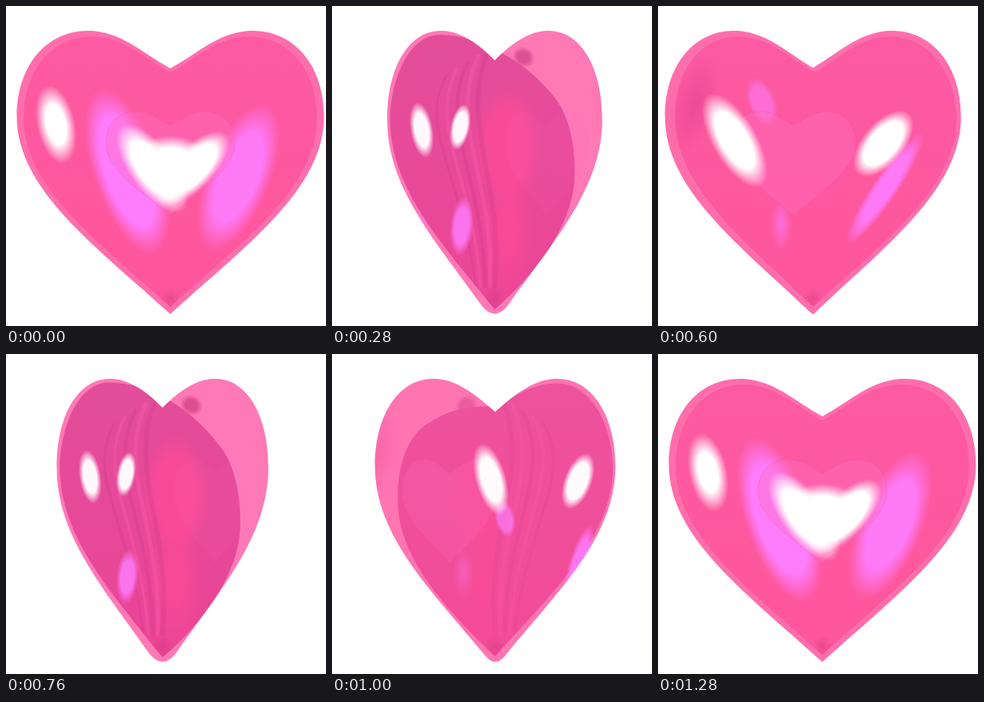
Recreate the animation shown at these times as an HTML page with a canvas. Size 400x400 px, loop 1.32 s.

```html
<!DOCTYPE html>
<html lang="en">
<head>
<meta charset="utf-8">
<title>Turning heart</title>
<style>
  html, body { margin: 0; width: 100%; height: 100%; overflow: hidden; background: #fff; }
  canvas { display: block; width: 400px; height: 400px; }
</style>
</head>
<body>
<canvas id="stage" width="400" height="400"></canvas>
<script>
const ctx = document.getElementById('stage').getContext('2d');
const LOOP = 1320, STEP = 40, TURN = 1280;
const AXIS = 199.5, MID_Y = 190, DEPTH = 66, SLICES = 120;
const RAD = Math.PI / 180;
const WHITE = '255,255,255', VIOLET = '255,125,255';

// Eased turn: [time, degrees]
const TURNS = [[0, 0], [160, 14.5], [440, 105], [600, 163.5], [920, 294], [1120, 345], [TURN, 360]];

// Half outline as bezier points: a full lobe, and a lobe smoothed into a teardrop
const LOBE = [[35, 59], [62, 31], [103, 31], [157, 31], [192, 77], [192, 138], [192, 230], [92, 301]];
const DROP = [[50, 62], [100, 95], [140, 135], [165, 165], [174, 205], [170, 240], [160, 290], [90, 350]];
const NOTCH = [0, 78], TIP = [0, 385];

const clamp = (v, lo, hi) => Math.min(hi, Math.max(lo, v));
const mix = (a, b, k) => a + (b - a) * k;
const blend = (p, q, k) => p.map((v, i) => mix(v, q[i], k));
const smooth = (a, b, v) => {
  const k = clamp((v - a) / (b - a), 0, 1);
  return k * k * (3 - 2 * k);
};

function angleAt(time) {
  const last = TURNS.length - 1;
  let i = 0;
  while (i < last - 1 && time > TURNS[i + 1][0]) i++;
  const slope = n => n === 0 || n === last ? 0
    : (TURNS[n + 1][1] - TURNS[n - 1][1]) / (TURNS[n + 1][0] - TURNS[n - 1][0]);
  const [t0, a0] = TURNS[i], [t1, a1] = TURNS[i + 1];
  const span = t1 - t0, k = (time - t0) / span, r = 1 - k;
  return a0 * (1 + 2 * k) * r * r + a1 * k * k * (3 - 2 * k)
    + span * k * r * (slope(i) * r - slope(i + 1) * k);
}

// drop smooths the lobe on the near side; bulge pushes the middle sideways
function addHeart(path, cx, squeeze, scale, { drop = 0, near = 1, bulge = 0 } = {}) {
  const place = ([x, y]) => {
    const rise = (y - MID_Y) / (TIP[1] - MID_Y);
    return [cx + x * scale * squeeze + bulge * (1 - rise * rise), MID_Y + (y - MID_Y) * scale];
  };
  const half = side => LOBE.map((p, i) => {
    const goal = side === near ? DROP[i] : i === 0 ? [20, 35] : p;
    const [x, y] = blend(p, goal, drop);
    return place([side * x, y]);
  });
  const notch = place(blend(NOTCH, [10 * near, 42], drop)), tip = place(TIP);
  const right = half(1), left = half(-1);
  const curve = (a, b, c) => path.bezierCurveTo(...a, ...b, ...c);
  path.moveTo(...notch);
  curve(right[0], right[1], right[2]);
  curve(right[3], right[4], right[5]);
  curve(right[6], right[7], tip);
  curve(left[7], left[6], left[5]);
  curve(left[4], left[3], left[2]);
  curve(left[1], left[0], notch);
  path.closePath();
}

function glow(color, core, x, y, rx, ry, tilt, alpha) {
  if (alpha <= 0) return;
  ctx.save();
  ctx.translate(x, y);
  ctx.rotate(tilt * RAD);
  ctx.scale(rx, ry);
  const fill = ctx.createRadialGradient(0, 0, 0, 0, 0, 1);
  fill.addColorStop(0, `rgba(${color},${alpha})`);
  fill.addColorStop(core, `rgba(${color},${alpha})`);
  fill.addColorStop(1, `rgba(${color},0)`);
  ctx.fillStyle = fill;
  ctx.fillRect(-1, -1, 2, 2);
  ctx.restore();
}

function drawInterior(cx, dir, side) {
  ctx.save();
  ctx.globalAlpha = side;
  glow('255,75,150', 0.6, cx - dir * 16, 175, 42, 75, 0, 0.9);
  glow('255,75,150', 0.3, cx - dir * 16, 280, 34, 85, 0, 0.8);
  ctx.lineCap = 'round';
  for (let i = 0; i < 5; i++) {
    const x = cx + dir * (8 + i * 13);
    ctx.strokeStyle = i % 2 ? 'rgba(255,95,175,.4)' : 'rgba(190,50,130,.25)';
    ctx.lineWidth = 6 - i * 0.7;
    ctx.beginPath();
    ctx.moveTo(x, 55 + i * 8);
    ctx.bezierCurveTo(x + dir * 38, 150, x - dir * 20, 210, cx + dir * i * 6, 350);
    ctx.stroke();
  }
  ctx.restore();
}

// Reflections slide with the tilt, merge when facing front and gather into a pair at the side
function drawReflections(cx, angle, squeeze, dir, side, drawInner) {
  const t = clamp(angle / 15, -1, 1), front = 1 - Math.abs(t);
  const reach = dir * (190 * squeeze - 48);
  const leftEdge = reach + Math.min(0, dir * 26), rightEdge = reach + Math.max(0, dir * 26);
  const shine = (color, core, facing, edge) => {
    const [x, ...shape] = blend(facing, edge, side);
    glow(color, core, cx + x, ...shape);
  };

  glow('222,58,142', 0.1, cx + 149 * t, 124, 28, 66, -15 * t, 0.45 * Math.abs(t) * (1 - side));
  shine(VIOLET, 0.65,
    [-70 - 6 * t + 16 * front, 181 + 61 * t + 26 * front, 24 + 7 * t + 18 * front,
      53 + 21 * t + 55 * front, -27 - 5 * t + 8 * front, 0.78 + 0.22 * t + 0.2 * front],
    [leftEdge, 298, 8, 15, 0, 0.8]);
  shine(VIOLET, 0.6,
    [81 - 9 * t + 4 * front, 214 - 14 * t, 26 + 10 * t + 14 * front, 98 + 14 * t, 29 - 5 * t - 7 * front, 0.9],
    [rightEdge, 298, 8, 15, 0, 0.8]);
  glow(VIOLET, 0.2, cx - 40, 273, 13, 32, 0, -0.55 * t * (1 - side));

  drawInner();

  glow(WHITE, 0.5, cx - 143 - 17 * t, 148 - 9 * t, 24 - 13 * t, 50 - 14 * t, -12 + 12 * t,
    (1 + Math.min(t, 0)) * (1 - side));
  glow(WHITE, 0.5, cx, 192, 48, 30, 0, front);
  shine(WHITE, 0.6,
    [-78 + 20 * t + 55 * front, 178 + 10 * t + 25 * front, 28, 66, -36 - 6 * t, 1],
    [leftEdge, 145, 10, 26, 0, 0.95]);
  shine(WHITE, 0.65,
    [76 - 12 * t - 48 * front, 172 + 31 * front, 26, 50 + 10 * front, 44 + 4 * t, 1],
    [rightEdge, 145, 8, 23, 0, 0.95]);
}

function draw(time) {
  const turn = angleAt(Math.min(time, TURN));
  const angle = turn - 180 * Math.round(turn / 180);
  const squeeze = Math.cos(angle * RAD), lean = Math.sin(angle * RAD);
  const cx = AXIS + 6 * Math.cos(turn * RAD);
  const dir = angle < 0 ? 1 : -1;
  const side = smooth(22, 62, Math.abs(angle));

  const body = new Path2D();
  for (let i = 0; i <= SLICES; i++) {
    const tilt = Math.PI * (i / SLICES - 0.5);
    addHeart(body, cx + DEPTH * Math.sin(tilt) * lean, squeeze, Math.cos(tilt));
  }
  const face = new Path2D();
  addHeart(face, cx, squeeze, mix(0.955, 0.975, side), { drop: side, near: -dir, bulge: -14 * lean });
  const inner = new Path2D();
  addHeart(inner, cx + 85 * lean, squeeze * 1.15, 0.365);

  ctx.fillStyle = '#fff';
  ctx.fillRect(0, 0, 400, 400);
  ctx.save();
  ctx.fillStyle = `rgb(255,${mix(110, 124, side)},${mix(172, 184, side)})`;
  ctx.fill(body);
  ctx.clip(body);
  glow('240,130,250', 0.1, cx - dir * 86, 180, 14, 65, 0, side * 0.4);
  glow('190,45,115', 0.5, cx - dir * 36, 64, 15, 13, -30 * dir, side * 0.7 * smooth(0.28, 0.4, squeeze));

  ctx.save();
  ctx.clip(face);
  const tone = ctx.createLinearGradient(0, 31, 0, 385);
  tone.addColorStop(0, `rgb(${mix(252, 220, side)},${mix(90, 74, side)},${mix(162, 152, side)})`);
  tone.addColorStop(1, `rgb(${mix(255, 230, side)},${mix(86, 64, side)},${mix(156, 148, side)})`);
  ctx.fillStyle = tone;
  ctx.fillRect(0, 0, 400, 400);
  drawInterior(cx, dir, side);
  glow('205,55,125', 0.1, cx, 366, 13, 14, 0, 0.4);
  ctx.restore();

  drawReflections(cx, angle, squeeze, dir, side, () => {
    ctx.save();
    ctx.globalAlpha = 1 - side;
    ctx.fillStyle = 'rgba(255,110,190,.4)';
    ctx.fill(inner);
    ctx.strokeStyle = 'rgba(235,75,165,.25)';
    ctx.stroke(inner);
    ctx.restore();
  });
  ctx.restore();
}

function tick() {
  const time = performance.now() % LOOP;
  draw(Math.floor(time / STEP) * STEP);
  requestAnimationFrame(tick);
}
tick();
</script>
</body>
</html>
```
